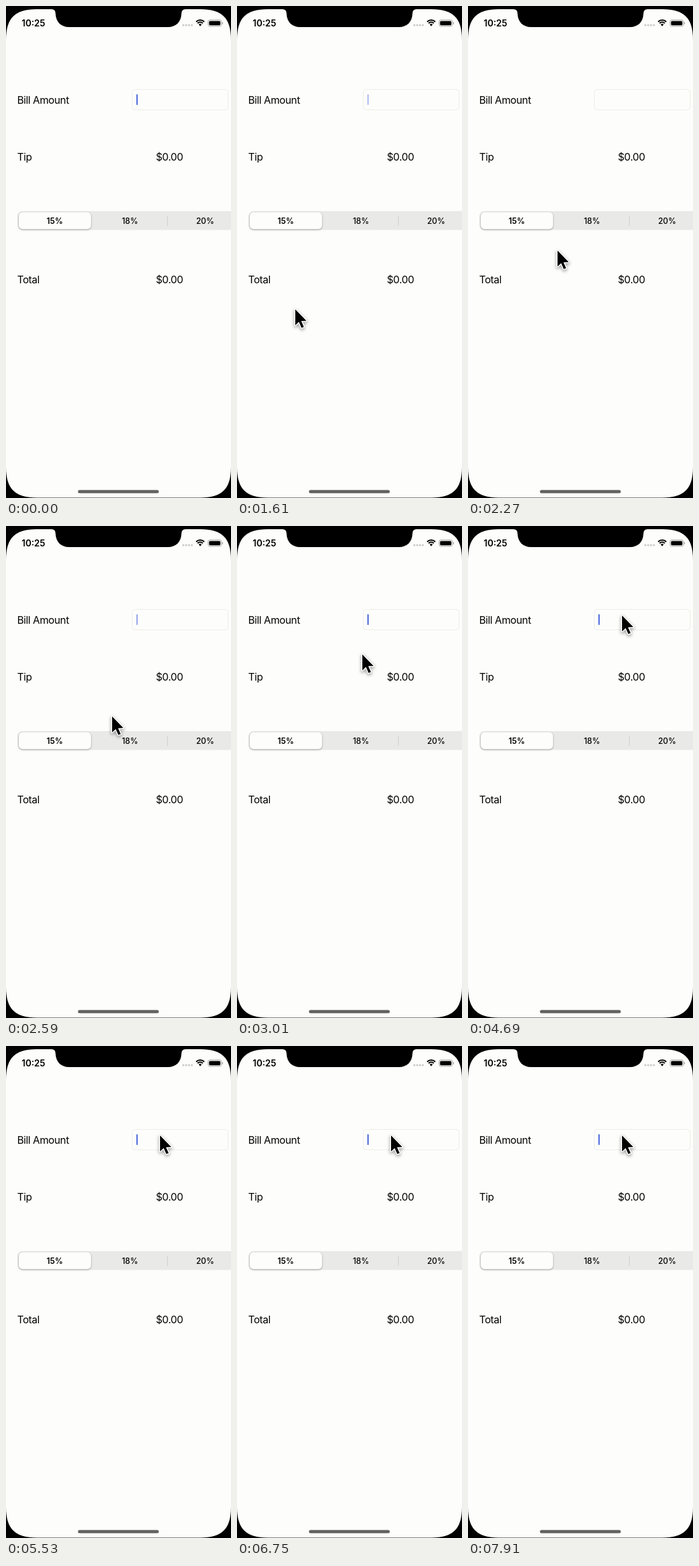
Animation, 352 px wide and 770 px high, one loop 8000 ms. Source, as an HTML page with a canvas:

```html
<!DOCTYPE html>
<html lang="en">
<head>
<meta charset="utf-8">
<title>Tip calculator</title>
<style>
html, body { margin: 0; width: 100%; height: 100%; overflow: hidden; background: #000; }
canvas { display: block; width: 352px; height: 770px; }
</style>
</head>
<body>
<canvas id="stage"></canvas>
<script>
const W = 352, H = 770, LOOP = 8000;
const PAPER = '#fdfdfb', TRACK = '#e9e9e8', LINE = '#ebebe6';
const canvas = document.getElementById('stage');
const dpr = window.devicePixelRatio || 1;
canvas.width = W * dpr;
canvas.height = H * dpr;
const ctx = canvas.getContext('2d');

// time, x, y of the pointer tip
const path = [
  [1330, -3, 632], [1470, 51, 544], [1610, 91, 475], [1750, 115, 429],
  [2130, 115, 429], [2270, 140, 383], [2640, 170, 285], [3010, 196, 201],
  [3340, 221, 168], [3670, 239, 151], [3950, 241, 140]
];

const clamp = v => Math.max(0, Math.min(1, v));

function box(x, y, w, h, r) {
  ctx.beginPath();
  ctx.roundRect(x, y, w, h, r);
}

function fillBox(x, y, w, h, r, color) {
  box(x, y, w, h, r);
  ctx.fillStyle = color;
  ctx.fill();
}

function label(text, x, y, size = 16, weight = 400, align = 'left') {
  ctx.font = `${weight} ${size}px Inter, "Liberation Sans", sans-serif`;
  ctx.letterSpacing = weight === 400 ? '-0.4px' : '0px';
  ctx.textAlign = align;
  ctx.fillStyle = '#000';
  ctx.fillText(text, x, y);
}

// rectangle whose corners ease in over the length reach
function smoothBox(l, t, r, b, reach, c) {
  ctx.beginPath();
  ctx.moveTo(l, t + reach);
  ctx.bezierCurveTo(l, t + c, l + c, t, l + reach, t);
  ctx.lineTo(r - reach, t);
  ctx.bezierCurveTo(r - c, t, r, t + c, r, t + reach);
  ctx.lineTo(r, b - reach);
  ctx.bezierCurveTo(r, b - c, r - c, b, r - reach, b);
  ctx.lineTo(l + reach, b);
  ctx.bezierCurveTo(l + c, b, l, b - c, l, b - reach);
  ctx.closePath();
}

function screen() {
  ctx.fillStyle = '#000';
  ctx.fillRect(0, 0, W, H);
  smoothBox(0, 5, W, H - 0.5, 48, 14);
  ctx.fillStyle = PAPER;
  ctx.fill();
  // notch with flared top corners
  ctx.beginPath();
  ctx.moveTo(71, 4);
  ctx.lineTo(71, 5);
  ctx.quadraticCurveTo(77.5, 5, 77.5, 12);
  ctx.bezierCurveTo(78, 25, 86, 33, 99, 33);
  ctx.lineTo(253, 33);
  ctx.bezierCurveTo(266, 33, 274, 25, 274.5, 12);
  ctx.quadraticCurveTo(274.5, 5, 281, 5);
  ctx.lineTo(281, 4);
  ctx.closePath();
  ctx.fillStyle = '#000';
  ctx.fill();
  fillBox(112.5, 757.5, 126.5, 5, 2.5, '#626262');
}

function statusBar() {
  label('10:25', 24.5, 32, 14, 600);
  for (let i = 0; i < 4; i++) fillBox(276 + i * 4.4, 28.5, 3, 3, 1, '#cacaca');

  ctx.strokeStyle = '#000';
  ctx.lineWidth = 2.1;
  for (const r of [9, 5.7]) {
    ctx.beginPath();
    ctx.arc(303.8, 31, r, -Math.PI * 0.75, -Math.PI * 0.25);
    ctx.stroke();
  }
  ctx.beginPath();
  ctx.moveTo(303.8, 31.8);
  ctx.arc(303.8, 31.2, 3.3, -Math.PI * 0.75, -Math.PI * 0.25);
  ctx.closePath();
  ctx.fillStyle = '#000';
  ctx.fill();

  box(316, 21.8, 21, 10, 3);
  ctx.strokeStyle = '#a6a6a6';
  ctx.lineWidth = 1;
  ctx.stroke();
  fillBox(317.6, 23.4, 17.8, 6.8, 1.6, '#000');
  fillBox(338, 25, 1.3, 3.6, 0.6, '#a6a6a6');
}

function form() {
  label('Bill Amount', 17.5, 153);
  label('Tip', 17.5, 242.3);
  label('Total', 17.5, 433.5);
  label('$0.00', 234.5, 242.3);
  label('$0.00', 234.5, 433.5);

  box(197.5, 130.5, 150, 32, 5);
  ctx.strokeStyle = LINE;
  ctx.lineWidth = 1;
  ctx.stroke();

  fillBox(18, 321, 360, 29.5, 8, TRACK);
  ctx.save();
  ctx.shadowColor = 'rgba(0, 0, 0, 0.35)';
  ctx.shadowBlur = 3 * dpr;
  ctx.shadowOffsetY = dpr;
  fillBox(20, 322.8, 113, 26.4, 6, PAPER);
  ctx.restore();
  ctx.fillStyle = '#cfcfcf';
  ctx.fillRect(252, 329, 1, 15);
  ['15%', '18%', '20%'].forEach((s, i) =>
    label(s, 76.3 + 117.6 * i, 340.5, 12.5, i ? 500 : 600, 'center'));
}

function caretAlpha(t) {
  if (t < 1330) return 1 - clamp((t - 10) / 60);
  if (t < 1585) return 0;
  const phase = (t - 1585) % 970;
  return phase < 585 ? clamp(phase / 60) : 1 - clamp((phase - 585) / 80);
}

function caret(t) {
  ctx.globalAlpha = caretAlpha(t);
  fillBox(204, 138, 2, 17, 1, '#4a68dc');
  ctx.globalAlpha = 1;
}

function pointerAt(t) {
  const i = path.findIndex(p => p[0] > t);
  if (i < 0) return path[path.length - 1].slice(1);
  const a = path[i - 1], b = path[i];
  const k = (t - a[0]) / (b[0] - a[0]);
  return [a[1] + (b[1] - a[1]) * k, a[2] + (b[2] - a[2]) * k];
}

function pointer(t) {
  if (t < path[0][0]) return;
  const [x, y] = pointerAt(t);
  ctx.save();
  ctx.translate(x, y);
  ctx.beginPath();
  [[0, 0], [0, 25], [5.6, 19.7], [9.8, 29], [13.4, 27.5], [9.3, 18.4], [17.5, 18]]
    .forEach(([px, py]) => ctx.lineTo(px, py));
  ctx.closePath();
  ctx.lineJoin = 'round';
  ctx.lineWidth = 3;
  ctx.strokeStyle = '#fff';
  ctx.shadowColor = 'rgba(0, 0, 0, 0.45)';
  ctx.shadowBlur = 5 * dpr;
  ctx.shadowOffsetY = 2 * dpr;
  ctx.stroke();
  ctx.shadowColor = 'transparent';
  ctx.fillStyle = '#000';
  ctx.fill();
  ctx.restore();
}

function draw(t) {
  ctx.setTransform(dpr, 0, 0, dpr, 0, 0);
  screen();
  statusBar();
  form();
  caret(t);
  pointer(t);
}

const start = performance.now();
function tick() {
  draw((performance.now() - start) % LOOP);
  requestAnimationFrame(tick);
}
tick();
</script>
</body>
</html>
```
